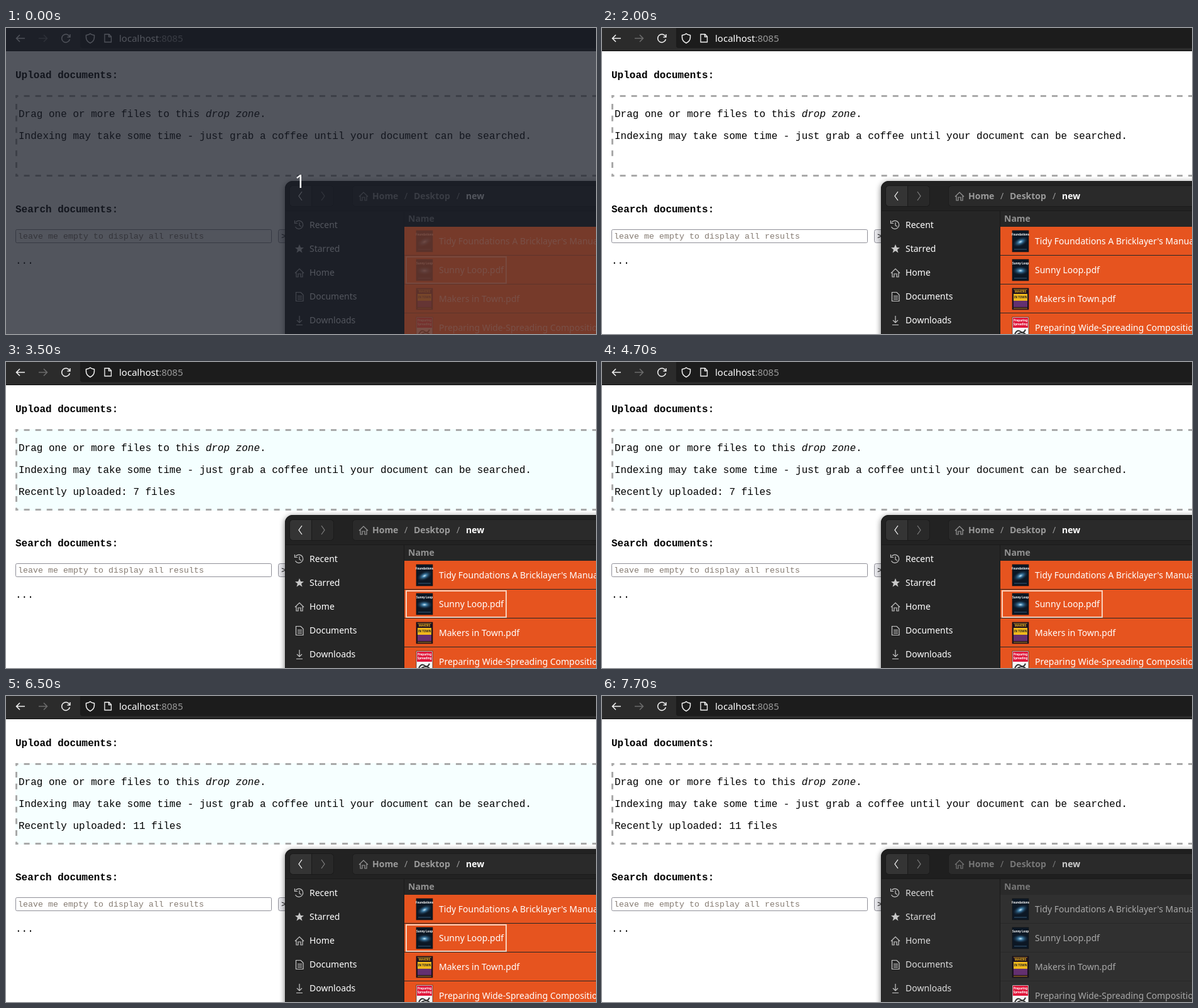
An HTML page for the animation above (7800 ms loop, 939 by 488 pixels).

```html
<!DOCTYPE html>
<html lang="en">
<head>
<meta charset="utf-8">
<title>Document upload</title>
<style>
html, body { margin: 0; width: 100%; height: 100%; overflow: hidden; background: #fff; }
svg { display: block; width: 939px; height: 488px; }
text { white-space: pre; }
.mono { font: 16px "Liberation Mono", monospace; }
.ui { font: 14px "Noto Sans", "Open Sans", sans-serif; fill: #fff; }
.bold { font-weight: bold; }
.line { fill: none; stroke: #c8c8c8; stroke-width: 1.2; }
#window { --list: #e6541f; --row: #fff; --gap: #262626; --side: #262626; --head: #222; --crumb: #9a9a9a; --here: #fff; --name: #929292; --item: #fff; }
#window.idle { --list: #303030; --row: #a8a8a8; --gap: #282828; --side: #2a2a2a; --head: #1f1f1f; --crumb: #777; --here: #ccc; --name: #777; --item: #ddd; }
</style>
</head>
<body>
<svg viewBox="0 0 939 488">
  <defs>
    <radialGradient id="glow">
      <stop offset="0" stop-color="#d8f2ff"/>
      <stop offset=".3" stop-color="#4a94c4" stop-opacity=".8"/>
      <stop offset="1" stop-color="#14304c" stop-opacity="0"/>
    </radialGradient>
    <filter id="shadow" x="-10%" y="-10%" width="120%" height="120%">
      <feGaussianBlur stdDeviation="5"/>
    </filter>
    <g id="house"><path d="M-7 1 0-6 7 1M-5 0V7H-2V2H2V7H5V0"/></g>
    <g id="pointer">
      <path d="M0 0V16L4 12.500 7 18.500 9.500 17.200 6.700 11.500H11Z" fill="#222" stroke="#fff"/>
    </g>
  </defs>

  <rect width="939" height="488" fill="#fff"/>

  <!-- Browser toolbar -->
  <rect width="939" height="37" fill="#2b2b2b"/>
  <rect x="118" y="-6" width="840" height="38" rx="4" fill="#1c1c1c"/>
  <rect y="36" width="939" height="1" fill="#0c0c0c"/>
  <g fill="none" stroke="#f4f4f4" stroke-width="1.5">
    <path d="M30 16.500H17M22 11 16.500 16.500 22 22"/>
    <path d="M52 16.500H65M60 11 65.500 16.500 60 22" stroke="#6c6c6c"/>
    <path d="M101 13.500A6.500 6.500 0 1 0 101.500 18M102 10V14.500H97.500"/>
    <path d="M134 9C136 11 138 11 140.500 11.500V15C140.500 19 138 22 134 24C130 22 127.500 19 127.500 15V11.500C130 11 132 11 134 9Z"/>
    <path d="M157 10H164L167.500 13.500V22.500H157ZM163.500 10V14H167.500" stroke-width="1.3"/>
  </g>
  <text class="ui" x="180" y="22" style="font-size:15px">localhost<tspan fill="#9b9b9b">:8085</tspan></text>

  <!-- Page -->
  <g class="mono">
    <text class="bold" x="15" y="80">Upload documents:</text>
    <rect id="zone" x="15" y="107" width="930" height="130" fill="#fff"/>
    <g fill="none" stroke="#a9a9a9" stroke-width="3">
      <path d="M15 108.500H960M15 235.500H960" stroke-dasharray="9 9.090" stroke-dashoffset="4.500"/>
      <path d="M16.500 107V237" stroke-dasharray="9 9.570" stroke-dashoffset="4.500"/>
    </g>
    <text x="20" y="142">Drag one or more files to this <tspan font-style="italic">drop zone</tspan>.</text>
    <text x="20" y="177">Indexing may take some time - just grab a coffee until your document can be searched.</text>
    <text id="status" x="20" y="212"></text>
    <text class="bold" x="15" y="294">Search documents:</text>
    <rect x="15.500" y="321.500" width="407" height="21" rx="2" fill="#fff" stroke="#8f8f98"/>
    <text x="19" y="336" fill="#857b72" style="font-size:13.333px">leave me empty to display all results</text>
    <rect x="433.500" y="321.500" width="40" height="21" rx="3" fill="#e9e9ed" stroke="#8f8f98"/>
    <text x="438" y="336" style="font-size:13.333px">&gt;</text>
    <text x="15" y="376">...</text>
  </g>

  <!-- File manager -->
  <g id="window" class="ui">
    <rect x="444" y="246" width="540" height="290" rx="12" opacity=".55" style="fill:#000" filter="url(#shadow)"/>
    <rect x="444" y="244" width="540" height="290" rx="12" style="fill:var(--head)"/>
    <path d="M444.500 488V256A11.500 11.500 0 0 1 456 244.500H939" fill="none" stroke="#181818"/>
    <rect x="451.500" y="251.500" width="70" height="33" rx="5" fill="#292929" stroke="#1a1a1a"/>
    <path d="M452 257a5 5 0 0 1 5-5H486V284H457a5 5 0 0 1-5-5Z" fill="#343434"/>
    <path d="M486.500 252V284" stroke="#1a1a1a"/>
    <path d="M471 261 466 268 471 275" class="line" style="stroke:#fff"/>
    <path d="M502 261 507 268 502 275" class="line" style="stroke:#808080"/>
    <rect x="551.500" y="251.500" width="400" height="33" rx="5" fill="#2a2a2a" stroke="#1c1c1c"/>
    <use href="#house" x="569" y="268" class="line" style="stroke:var(--crumb)"/>
    <g class="bold" style="fill:var(--crumb)">
      <text x="583" y="273">Home</text><text x="634" y="273" font-weight="400">/</text>
      <text x="649" y="273">Desktop</text><text x="717" y="273" font-weight="400">/</text>
      <text x="732" y="273" style="fill:var(--here)">new</text>
    </g>
    <rect x="445" y="291" width="494" height="197" style="fill:var(--side)"/>
    <path d="M445 291.500H939M633.500 292V488" stroke="#1a1a1a"/>
    <g id="places" style="fill:var(--item)"></g>
    <g class="line">
      <path d="M461 310A6.500 6.500 0 1 1 460.500 317M459.500 307V311.500H464M467 310V315L470 316.500"/>
      <path d="M467 345 469 350 474 350.300 470 353.500 471.500 358.500 467 355.500 462.500 358.500 464 353.500 460 350.300 465 350Z" fill="#c8c8c8" stroke="none"/>
      <use href="#house" x="467" y="390"/>
      <path d="M461.500 421.500H469L473 425.500V435.500H461.500ZM464 427.500H471M464 430H471M464 432.500H471"/>
      <path d="M467 459V470M463 466 467 470 471 466M462 473.500H472"/>
    </g>
    <text class="bold" x="640" y="309" style="fill:var(--name)">Name</text>
    <g id="files"></g>
    <rect id="focus" x="637" y="365" width="159" height="42" fill="none" stroke="#f8d0bc" stroke-width="2"/>
  </g>

  <g id="ghost"></g>
  <use id="cursor" href="#pointer"/>

  <!-- Countdown -->
  <g id="countdown">
    <rect width="939" height="488" fill="#181d27" opacity=".75"/>
    <rect x="634" y="317" width="305" height="171" fill="#a04a30" opacity=".5"/>
    <text class="ui" x="468" y="255" text-anchor="middle" style="font-size:29px">1</text>
  </g>
</svg>

<script>
const LOOP = 7800;
const $ = id => document.getElementById(id);
const clamp = x => Math.min(1, Math.max(0, x));
const mix = (a, b, k) => a + (b - a) * k;
const show = (id, on) => $(id).setAttribute("visibility", on ? "visible" : "hidden");
const place = (id, x, y) => $(id).setAttribute("transform", `translate(${x} ${y})`);

const tiny = (y, words, color = "#fff") =>
  `<text x="13" y="${y}" text-anchor="middle" style="font-size:4.500px;font-weight:bold;fill:${color}">${words}</text>`;
const board = color => `<rect width="26" height="34" fill="${color}" stroke="#111" stroke-width=".6"/>`;
const nightCover = (title, tilt) => board("#0c1724") +
  `<ellipse cx="13" cy="18" rx="13" ry="7" fill="url(#glow)" transform="rotate(${tilt} 13 18)"/>` +
  `<path d="M3 30H23" stroke="#365b78"/>` + tiny(8, title);

const covers = [
  nightCover("Foundations", -25),
  nightCover("Sunny Loop", 0),
  board("#1c1020") + `<path d="M2 2H24M2 32H24" stroke="#c08a20"/>
    <rect x="2" y="18" width="22" height="12" fill="#633070"/>
    <rect x="2" y="9" width="22" height="11" fill="#f0b81c"/>` +
    tiny(7, "MAKERS", "#f0b81c") + tiny(16, "IN TOWN", "#222"),
  board("#f4f4f4") + `<rect x="1" y="1" width="24" height="16" fill="#e0183c"/>
    <path d="M4 27q4-8 9-4t8-3M5 30q8-8 16-3" fill="none" stroke="#333" stroke-width="2"/>` +
    tiny(7, "Preparing") + tiny(13, "Spreading"),
];
const titles = [
  "Tidy Foundations A Bricklayer's Manual.pdf",
  "Sunny Loop.pdf",
  "Makers in Town.pdf",
  "Preparing Wide-Spreading Compositions.pdf",
];

$("files").innerHTML = titles.map((title, i) => {
  const y = 317 + 46 * i;
  return `<rect x="634" y="${y}" width="305" height="46" style="fill:var(--list)"/>
    <rect x="634" y="${y + 45}" width="305" height="1" style="fill:var(--gap)"/>
    <g transform="translate(653 ${y + 6})">${covers[i]}</g>
    <text x="689" y="${y + 28}" style="fill:var(--row)">${title}</text>`;
}).join("");

$("places").innerHTML = ["Recent", "Starred", "Home", "Documents", "Downloads"]
  .map((name, i) => `<text x="483" y="${319 + 38 * i}">${name}</text>`).join("");

$("ghost").innerHTML = [2, 1, 0].map(i =>
  `<g transform="translate(${-25 + 8 * i} ${-32 + 7 * i}) scale(1.4)">${covers[i]}</g>`).join("") +
  `<use href="#pointer"/>`;

// The zone lights up for a second, then fades back to white.
const flash = (t, start) => t < start ? 0 : 1 - clamp((t - start - 900) / 700);

function draw(time) {
  const t = Math.floor(time % LOOP / 100) * 100;
  show("countdown", t < 100);
  $("window").classList.toggle("idle", t >= 7700);
  show("focus", t < 2000 || t >= 3300 && t < 7700);

  const drag = clamp((t - 2000) / 700);
  show("ghost", t >= 2100 && t < 3300);
  place("ghost", mix(905, 787, drag), mix(374, 190, drag));

  const glow = t < 5500 ? flash(t, 3500) : flash(t, 5500);
  $("zone").setAttribute("fill", `rgb(${Math.round(255 - 11 * glow)} 255 255)`);
  $("status").textContent = t < 3500 ? "" : `Recently uploaded: ${t < 5500 ? 7 : 11} files`;

  const leave = clamp((t - 5600) / 400);
  show("cursor", t >= 5500 && t < 6000);
  place("cursor", mix(786, 940, leave), 190);
}

function tick() {
  draw(performance.now());
  requestAnimationFrame(tick);
}
tick();
</script>
</body>
</html>
```
